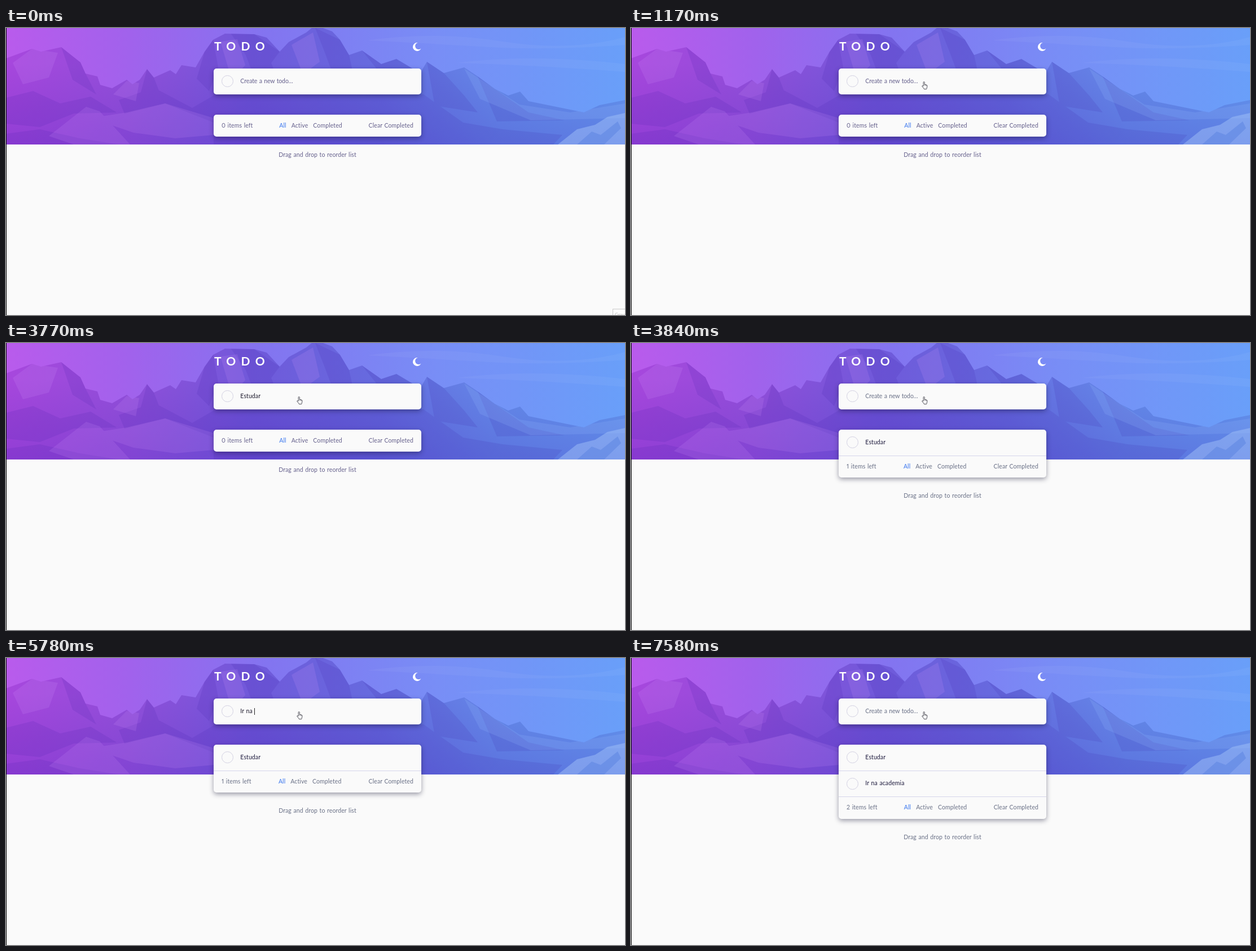
Recreate the animation shown at these times as an HTML page. Size 1097 by 510 pixels, loop 8000 ms.

```html
<!DOCTYPE html>
<html lang="en">
<head>
<meta charset="utf-8">
<title>Todo</title>
<style>
  * { box-sizing: border-box; margin: 0; padding: 0; }
  html, body { width: 100%; height: 100%; overflow: hidden; background: #fafafa; }
  body { position: relative; font: 10.5px/14px Lato, sans-serif; font-variant-numeric: proportional-nums; letter-spacing: .1px; word-spacing: .8px; color: #65608c; }
  body.late { color: #697086; }
  [hidden] { display: none !important; }
  .layer { position: absolute; left: 0; top: 0; }
  .edge { position: absolute; left: 0; top: 0; width: 1px; height: 100%; background: #050505; }
  h1 { position: absolute; left: 369px; top: 19px; font: 700 21px/25px Lato, sans-serif; letter-spacing: 9.2px; color: #fff; }
  .card { width: 368px; background: #fafafa; border-radius: 5px; box-shadow: 0 3px 9px rgba(20, 20, 50, .42); }
  .new { position: absolute; left: 368px; top: 71.5px; }
  .list { position: absolute; left: 368px; top: 154.2px; width: 368px; }
  .row { display: flex; align-items: center; height: 46.4px; padding: 0 14px; }
  .row::before { content: ""; width: 19px; height: 19px; margin-right: 12.3px; border: 1px solid #d3d1e2; border-radius: 50%; }
  .list .row { border-bottom: 1px solid #d6d5ea; color: #1d1a3d; }
  .row span, footer span, .hint { position: relative; top: -.8px; white-space: pre; }
  .placeholder { letter-spacing: -.1px; }
  .typed { color: #1d1a2c; }
  .caret { width: 1px; height: 12px; background: #222; }
  .placeholder + .caret { position: absolute; left: 46px; }
  footer { display: flex; justify-content: space-between; align-items: center; height: 38.6px; padding: 0 14px; }
  nav { display: flex; gap: 9px; }
  nav span:first-child { color: #3a76ee; }
  .hint { margin-top: 25.8px; text-align: center; }
  .tip { position: absolute; left: 1075px; top: 499px; width: 40px; height: 20px; padding: 2px 3px; border: 1px solid #c9c9c9; background: #fdfdfd; font-size: 8px; color: #b4b4b4; }
  .pointer { position: absolute; left: 0; top: 0; width: 14px; height: 17px; overflow: visible; }
</style>
</head>
<body>
<svg class="layer" width="1097" height="207" viewBox="0 0 1097 207">
  <defs>
    <linearGradient id="sky">
      <stop stop-color="#b95bec"/><stop offset=".2" stop-color="#a162ec"/><stop offset=".42" stop-color="#8374f0"/>
      <stop offset=".7" stop-color="#788ef6"/><stop offset="1" stop-color="#699ff9"/>
    </linearGradient>
    <linearGradient id="rock">
      <stop stop-color="#a747dd"/><stop offset=".2" stop-color="#924fda"/><stop offset=".4" stop-color="#7059da"/>
      <stop offset=".6" stop-color="#666bdf"/><stop offset=".8" stop-color="#648ae9"/><stop offset="1" stop-color="#6497ee"/>
    </linearGradient>
    <linearGradient id="depth" x2="0" y2="1">
      <stop offset=".3" stop-color="#3420a8" stop-opacity="0"/><stop offset="1" stop-color="#4018b8" stop-opacity=".2"/>
    </linearGradient>
    <clipPath id="ridge">
      <path d="M0 54 46 37 62 42 98 34 118 50 132 61 141 81 162 86 167 101 188 107 214 92 224 100 237 92 250 73 262 88 291 75 301 82 311 66 336 70 352 42 367 21 388 10 440 11 462 17 485 42 501 25 532 8 548-5 578 6 592 21 608 48 631 40 665 64 692 55 734 80 746 60 776 80 812 70 836 86 866 108 890 120 911 113 926 130 1024 150 1052 137 1097 128V207H0z"/>
    </clipPath>
  </defs>
  <path fill="url(#sky)" d="M0 0H1097V207H0z"/>
  <g fill="#fff" opacity=".04">
    <path d="M640 22Q760 5 880 24T1097 16V30Q960 40 860 34T640 22z"/>
    <path d="M800 62Q930 45 1097 64V78Q940 66 800 62z"/>
  </g>
  <g clip-path="url(#ridge)">
    <path fill="url(#rock)" d="M0-9H1097V207H0z"/>
    <path fill="url(#depth)" d="M0 0H1097V207H0z"/>
    <g fill="#3a1fa6" opacity=".12">
      <path d="M0 124 48 112 96 134 150 122 196 150 120 152 60 176 0 170z"/>
      <path d="M200 128 262 106 330 142 368 120V168L282 134 210 152z"/>
      <path d="M0 188 60 180 130 196 200 207H0z"/>
      <path d="M352 42 367 21 376 70 360 112 338 90z"/>
      <path d="M398 9 440 11 485 42 470 62 492 118 440 88 425 48z"/>
      <path d="M548 0 592 21 608 48 622 112 580 84 566 46z"/>
      <path d="M631 40 692 55 734 80 720 132 672 108 655 70z"/>
      <path d="M746 60 776 80 812 120 836 150 760 138z"/>
      <path d="M98 34 132 61 141 81 160 118 118 92z"/>
      <path d="M250 73 262 88 278 130 238 118z"/>
      <path d="M836 86 866 108 926 150 990 164 870 166z"/>
      <path d="M368 118H740L810 168 880 180 986 190 970 207H368z"/>
    </g>
    <g fill="#d79cff" opacity=".15">
      <path d="M12 62 46 37 92 44 76 88 30 100z"/>
      <path d="M190 118 214 94 236 98 230 130z"/>
      <path d="M76 192 142 140 166 148 220 207H120z"/>
      <path d="M150 160 214 150 282 134 368 160V190L300 196 226 186z"/>
      <path d="M380 24 410 20 424 66 400 92z"/>
      <path d="M506 30 544 8 556 60 526 82z"/>
    </g>
    <path fill="#8fb2fa" opacity=".2" d="M812 72 836 88 910 136 1000 150 1097 134V160L930 164 840 126z"/>
    <path fill="#a6c5f8" opacity=".45" d="M978 207 1012 180 1044 172 1066 158 1097 151V207z"/>
    <path fill="#527bdc" opacity=".4" d="M1012 207 1038 184 1054 190 1084 166 1090 178 1060 207z"/>
  </g>
  <path fill="#fff" d="M729.9 26.1A7.5 7.5 0 1 0 735.5 36.2 6.05 6.05 0 1 1 729.9 26.1z"/>
</svg>

<h1>TODO</h1>
<div class="card new row">
  <span id="entry"></span><i class="caret" id="caret"></i>
</div>
<div class="list">
  <div class="card">
    <div class="row" id="first"><span>Estudar</span></div>
    <div class="row" id="second"><span>Ir na academia</span></div>
    <footer>
      <span id="left"></span>
      <nav><span>All</span><span>Active</span><span>Completed</span></nav>
      <span>Clear Completed</span>
    </footer>
  </div>
  <p class="hint">Drag and drop to reorder list</p>
</div>
<div class="tip" id="tip">Gravar</div>
<div class="edge"></div>
<svg class="pointer" id="pointer" viewBox="0 0 14 17" stroke-linejoin="round">
  <path id="arrow" fill="#111" stroke="#fff" stroke-width=".8" d="M.5.5V11.6L3.2 9.2 5 13.4 6.9 12.6 5.1 8.5H8.6z"/>
  <g id="hand" stroke="#3c3c46" stroke-width=".9">
    <path fill="#fff" d="M3.2 8.4V1.6a1.05 1.05 0 0 1 2.1 0V5.3L9 6.2Q10.1 6.6 9.9 8L9.4 11.2 8.7 13.6H4.4L3.8 12.1.7 8.6Q.8 7.2 2.1 7.6z"/>
    <path fill="none" stroke-width=".6" d="M5.3 5.3V7.6M7 5.8V7.6M8.5 6.2V7.7"/>
  </g>
</svg>

<script>
  const LOOP = 8000;
  const FOCUS = 1440;
  const BLINK = 530;
  const ADDED = [3840, 7450];
  const ENTRIES = [
    { text: 'Estudar', keys: [2050, 2380, 2640, 2840, 2910, 3040, 3240] },
    { text: 'Ir na academia', keys: [4650, 4910, 5310, 5510, 5580, 5780, 5920, 6190, 6250, 6450, 6650, 6780, 6920, 7050] }
  ];
  const RESETS = [FOCUS, ...ENTRIES.flatMap(entry => entry.keys)];
  const MOVE = { start: 260, step: 70, count: 13, from: [1059, 497], to: [515, 95] };

  const el = id => document.getElementById(id);
  const show = (id, on) => el(id).style.display = on ? '' : 'none';
  const setText = (node, text) => { if (node.textContent !== text) node.textContent = text; };

  function movePointer(t) {
    const tick = Math.min(MOVE.count, Math.floor((t - MOVE.start) / MOVE.step));
    const rest = Math.pow(1 - Math.max(0, tick) / MOVE.count, 2.25);
    const [x, y] = MOVE.to.map((end, i) => end + (MOVE.from[i] - end) * rest);
    el('pointer').style.transform = `translate(${x}px, ${y}px)`;
    show('pointer', tick >= 0);
    show('arrow', tick < 11);
    show('hand', tick >= 11);
  }

  // The blink restarts with every key press.
  function caretVisible(t) {
    const last = RESETS.filter(time => time <= t).pop();
    return last !== undefined && Math.floor((t - last) / BLINK) % 2 === 0;
  }

  function render(t) {
    const items = ADDED.filter(time => t >= time).length;
    const entry = ENTRIES[items];
    const typed = entry ? entry.text.slice(0, entry.keys.filter(time => t >= time).length) : '';

    setText(el('entry'), typed || 'Create a new todo…');
    el('entry').className = typed ? 'typed' : 'placeholder';
    show('caret', caretVisible(t));

    setText(el('left'), `${items} items left`);
    show('first', items > 0);
    show('second', items > 1);
    document.body.className = items ? 'late' : '';
    show('tip', t < 70);
    movePointer(t);
  }

  const begin = performance.now();
  function frame() {
    render((performance.now() - begin) % LOOP);
    requestAnimationFrame(frame);
  }
  render(0);
  requestAnimationFrame(frame);
</script>
</body>
</html>
```
